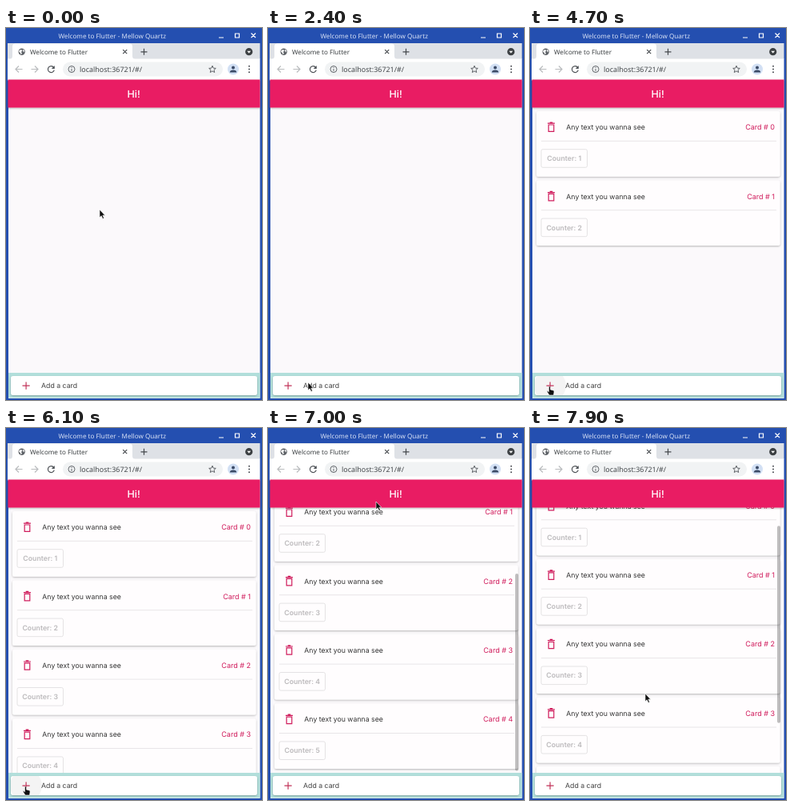
Write an HTML page that moves like this. It is 320x465 px and loops after 8000 ms.

```html
<!DOCTYPE html>
<html lang="en">
<head>
<meta charset="utf-8">
<title>Card list</title>
<style>
  html, body { margin: 0; width: 100%; height: 100%; overflow: hidden; background: #244fb0; }
  svg { display: block; width: 100%; height: 100%; text-rendering: geometricPrecision; }
  .ui { font-family: "Noto Sans", sans-serif; }
  .app { font: 8.75px Inter, sans-serif; }
  .line { fill: none; stroke-width: 1.2; }
  .accent { fill: #d01c5c; }
</style>
</head>
<body>
<svg viewBox="0 0 320 465">
  <defs>
    <clipPath id="listClip"><rect x="3" y="99" width="314" height="332"/></clipPath>
    <clipPath id="barClip"><rect x="6" y="435" width="308" height="24" rx="3"/></clipPath>
    <filter id="shadow" x="-5%" y="-20%" width="110%" height="150%">
      <feDropShadow dx="0" dy="1" stdDeviation="0.8" flood-opacity=".28"/>
    </filter>
    <g id="trash" class="line" stroke="#d01c5c">
      <path d="M22 119.2H31M24.7 118H28.3M23.2 121V129.4H29.8V121Z"/>
    </g>
  </defs>

  <!-- Window and tab strip -->
  <rect width="320" height="465" fill="#244fb0"/>
  <g class="ui">
    <text x="132.7" y="12.8" font-size="8.15" text-anchor="middle" fill="#d6e0f5">Welcome to Flutter - Mellow Quartz</text>
    <path class="line" stroke="#fff" d="M266 12H272M286.5 7H291.5V12H286.5ZM306.5 6.5L312 12M312 6.5L306.5 12"/>
    <rect x="2" y="19" width="315.5" height="20" fill="#dee1e6"/>
    <path fill="#fff" d="M4 39Q8 39 8 35V23Q8 19.5 12 19.5H154Q158 19.5 158 23V35Q158 39 162 39Z"/>
    <circle cx="19.7" cy="29.7" r="4.2" fill="#5f6368"/>
    <path fill="#fff" d="M16.5 28L19 27L20.5 28.2L19 30L20 32L18.3 33L18 31L16.3 30ZM21 26.5L23 28.3L22.5 30.5L21.3 29Z"/>
    <text x="30" y="32.8" font-size="8.1" fill="#3c4043">Welcome to Flutter</text>
    <path class="line" stroke="#45494d" d="M146.2 27.2L151.2 32.2M151.2 27.2L146.2 32.2M168.5 29.8H176.5M172.5 25.8V33.8"/>
    <circle cx="303.7" cy="29.7" r="4.6" fill="#3c4043"/>
    <path d="M301.3 28.7H306.1L303.7 31.5Z" fill="#fff"/>
  </g>

  <!-- Toolbar -->
  <g class="ui">
    <rect x="2" y="38.5" width="315.5" height="27" fill="#fff"/>
    <path class="line" stroke="#babcbe" d="M20.5 51.5H12M16 47.5L12 51.5L16 55.5M31.5 51.5H40M36 47.5L40 51.5L36 55.5"/>
    <path class="line" stroke="#4d5156" d="M59.7 49.2A4 4 0 1 0 60.3 52.7"/>
    <path d="M60.8 47V51H56.8Z" fill="#4d5156"/>
    <rect x="71" y="42.5" width="200" height="18" rx="9" fill="#f1f3f4"/>
    <g class="line" stroke="#5f6368">
      <circle cx="82" cy="51.5" r="4" stroke-width="1"/>
      <path stroke-width="1" d="M82 51V53.8M82 49V50"/>
      <path stroke-width="1" d="M258 47.2L259.2 50.1L262.3 50.4L260 52.4L260.7 55.5L258 53.9L255.3 55.5L256 52.4L253.7 50.4L256.8 50.1Z"/>
    </g>
    <text x="92" y="54.7" font-size="8.95" fill="#44484c">localhost:36721/#/</text>
    <circle cx="284" cy="51.5" r="7" fill="#d2e0f4"/>
    <g fill="#3a4a66"><circle cx="284" cy="49.6" r="2"/><path d="M279.8 55.5Q279.8 52.5 284 52.5T288.2 55.5Z"/></g>
    <g fill="#4d5156"><circle cx="304" cy="47.7" r="1"/><circle cx="304" cy="51.5" r="1"/><circle cx="304" cy="55.3" r="1"/></g>
  </g>

  <!-- Application -->
  <g class="app">
    <rect x="3" y="65" width="314.5" height="398" fill="#fbf9fb"/>
    <g clip-path="url(#listClip)">
      <g id="list"></g>
      <rect id="thumb" x="309" y="102" width="4" height="246.5" rx="2" fill="#000" opacity=".25"/>
    </g>
    <rect x="2.5" y="64.5" width="315" height="35" fill="#e91e63" filter="url(#shadow)"/>
    <text x="159.7" y="87" font-size="12.5" font-weight="500" text-anchor="middle" fill="#fff">Hi!</text>
    <rect x="3" y="431" width="314.5" height="31.5" fill="#b2dfdb"/>
    <rect x="6" y="435" width="308" height="24" rx="3" fill="#fff" filter="url(#shadow)"/>
    <g clip-path="url(#barClip)"><circle id="hover" cx="25" cy="447" r="20"/></g>
    <path class="line" stroke="#c2355b" stroke-width="1.4" d="M20.5 447.2H29.7M25.1 442.6V451.8"/>
    <text x="44" y="450.4" fill="#424242">Add a card</text>
  </g>

  <g id="cursor" stroke="#fff" stroke-width=".6" fill="#111">
    <path id="arrow" d="M0 0V9.8L2.2 7.8L3.9 11.4L5.5 10.6L3.9 7.2H6.8Z"/>
    <path id="hand" d="M0 .6Q1-.5 2 .6V4L5.8 5Q6.8 5.4 6.6 7L6 11H.6L-2 7Q-2.6 5.8-1.6 5.6L0 6.8Z"/>
  </g>
</svg>

<script>
const LOOP = 8000;
const CARD_STEP = 86.4;
const MAX_SCROLL = 105.4;
const clicks = [3200, 4400, 5200, 5650, 6300];

// time, x, y of the pointer tip
const path = [
  [0, 117, 227], [1450, 117, 227], [2100, 50, 443], [2600, 50, 443],
  [2900, 23.5, 448], [6300, 23.5, 448], [6550, 128, 340], [6650, 128, 340],
  [6900, 135, 92], [7000, 135, 92], [7200, 143, 257], [7400, 144, 345],
  [7600, 144, 358.5], [7700, 144, 358.5], [7900, 144, 332], [8000, 144, 318]
];

const $ = id => document.getElementById(id);
const clamp = (v, lo, hi) => Math.min(hi, Math.max(lo, v));
const show = (el, on) => el.setAttribute("visibility", on ? "visible" : "hidden");

$("list").innerHTML = clicks.map((_, i) => `
  <g transform="translate(0 ${i * CARD_STEP})">
    <rect x="8" y="104" width="304.5" height="81.7" rx="2.5" fill="#fffdfe" filter="url(#shadow)"/>
    <use href="#trash"/>
    <text x="45.3" y="127.2" fill="#333">Any text you wanna see</text>
    <text class="accent" x="306" y="127.2" font-size="9" text-anchor="end">Card # ${i}</text>
    <path d="M14 141.3H308" stroke="#e2e0e2" stroke-width=".8"/>
    <rect x="14" y="151.7" width="57.5" height="22.6" rx="2" fill="none" stroke="#dedcde" stroke-width=".8"/>
    <text x="42.7" y="166.2" font-weight="600" text-anchor="middle" fill="#bcbabc">Counter: ${i + 1}</text>
  </g>`).join("");
const cards = [...$("list").children];

function pointerAt(t) {
  const next = path.findIndex(p => p[0] > t);
  const [t0, x0, y0] = path[next - 1], [t1, x1, y1] = path[next];
  const k = (t - t0) / (t1 - t0), e = k * k * (3 - 2 * k);
  return [x0 + (x1 - x0) * e, y0 + (y1 - y0) * e];
}

// The list follows the drag and stops at both ends.
function scrollAt(t, y) {
  if (t < 6650) return 0;
  const offset = t < 7000 ? 340 - y : t < 7600 ? MAX_SCROLL + 92 - y : 358.5 - y;
  return clamp(offset, 0, MAX_SCROLL);
}

function draw(now) {
  const t = now % LOOP;
  const [x, y] = pointerAt(t);
  const scroll = scrollAt(t, y);
  const overButton = Math.hypot(x - 25, y - 447) < 18;
  const pressed = clicks.some(c => t >= c && t < c + 200);

  cards.forEach((card, i) => show(card, t >= clicks[i]));
  $("list").setAttribute("transform", `translate(0 ${-scroll})`);
  $("thumb").setAttribute("y", 102 + scroll * 0.76);
  show($("thumb"), t > 6660);

  $("hover").setAttribute("opacity", overButton ? (pressed ? 0.09 : 0.045) : 0);
  $("cursor").setAttribute("transform", `translate(${x} ${y})`);
  show($("arrow"), !overButton);
  show($("hand"), overButton);
  requestAnimationFrame(draw);
}
requestAnimationFrame(draw);
</script>
</body>
</html>
```
